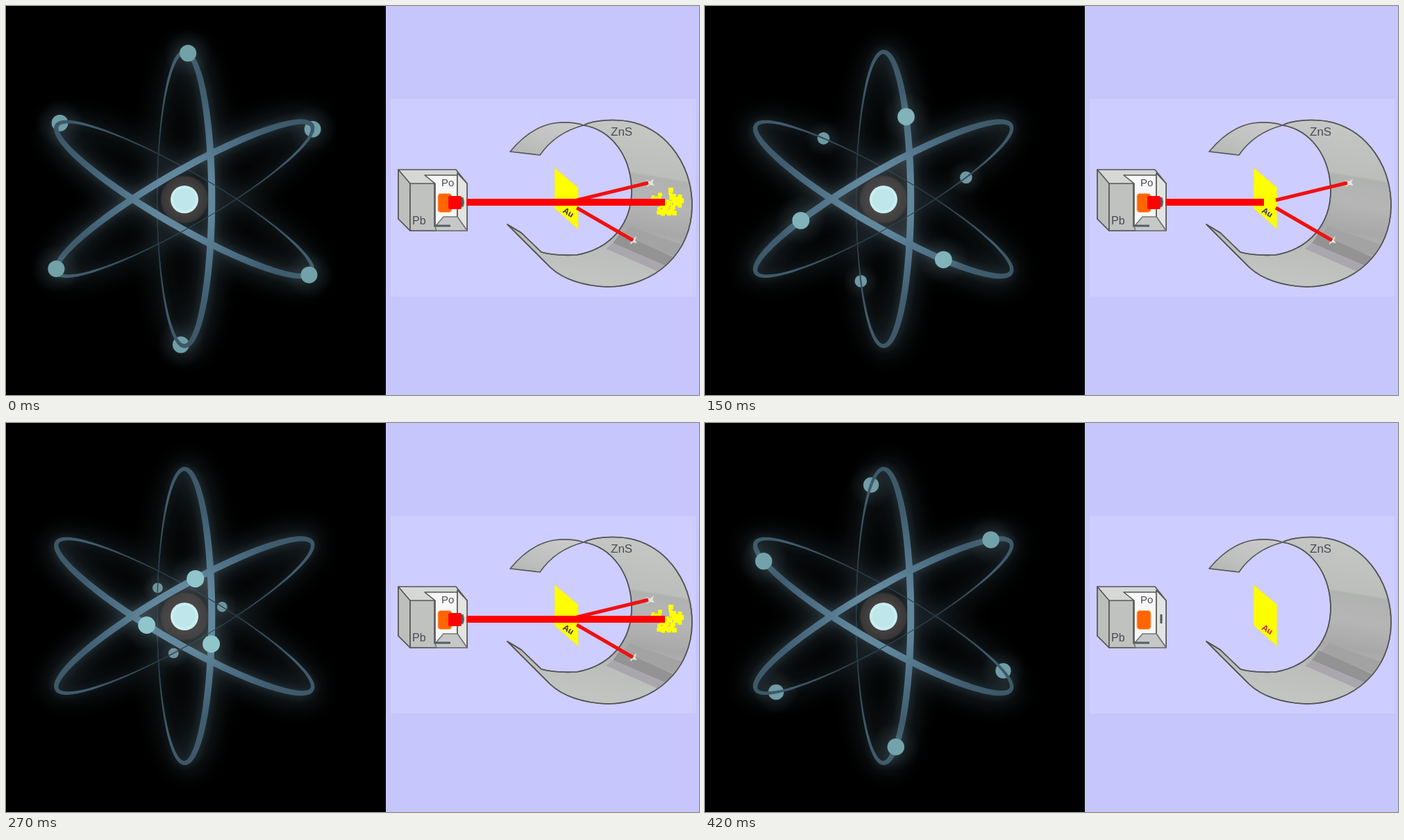
Recreate the animation shown at these times as an HTML page. Size 998x561 px, loop 450 ms.

```html
<!DOCTYPE html>
<html lang="en">
<head>
<meta charset="utf-8">
<title>Atom and scattering</title>
<style>
html, body { margin: 0; width: 100%; height: 100%; overflow: hidden; background: #000; }
svg { display: block; width: 100vw; height: 100vh; }
text { font-family: "Liberation Sans", Arial, sans-serif; fill: #4a4a54; }
</style>
</head>
<body>
<svg viewBox="0 0 998 561" preserveAspectRatio="none">
  <defs>
    <radialGradient id="line" gradientUnits="userSpaceOnUse" cx="257" cy="278.300" r="215">
      <stop offset=".2" stop-color="#62889d"/>
      <stop offset=".45" stop-color="#4f7186"/>
      <stop offset=".7" stop-color="#415e71"/>
      <stop offset="1" stop-color="#3c5867"/>
    </radialGradient>
    <radialGradient id="dim" gradientUnits="userSpaceOnUse" cx="0" cy="0" r="1" gradientTransform="translate(217 278.300) scale(48 175)">
      <stop offset=".35" stop-opacity=".58"/>
      <stop offset="1" stop-opacity="0"/>
    </radialGradient>
    <radialGradient id="core">
      <stop offset=".5" stop-color="#4a4545"/>
      <stop offset=".9" stop-color="#3d3a3a" stop-opacity=".9"/>
      <stop offset="1" stop-color="#333" stop-opacity="0"/>
    </radialGradient>
    <radialGradient id="halo">
      <stop offset="0" stop-color="#7fa5b0" stop-opacity=".17"/>
      <stop offset="1" stop-color="#7fa5b0" stop-opacity="0"/>
    </radialGradient>
    <linearGradient id="wall" gradientUnits="userSpaceOnUse" x1="945" y1="164" x2="905" y2="405">
      <stop offset="0" stop-color="#c6c8c6"/>
      <stop offset=".33" stop-color="#bcbebc"/>
      <stop offset=".345" stop-color="#b0b2b0"/>
      <stop offset=".5" stop-color="#b5b5b5"/>
      <stop offset=".66" stop-color="#a8a8a8"/>
      <stop offset=".82" stop-color="#bcbebc"/>
      <stop offset="1" stop-color="#c2c4c2"/>
    </linearGradient>
    <linearGradient id="flap" x1="0" y1="1" x2="1" y2="0">
      <stop offset="0" stop-color="#b4b6b4"/>
      <stop offset=".45" stop-color="#c0c2c0"/>
      <stop offset="1" stop-color="#ccc"/>
    </linearGradient>
    <filter id="wide" filterUnits="userSpaceOnUse" x="0" y="0" width="547" height="561"><feGaussianBlur stdDeviation="17"/></filter>
    <filter id="soft" filterUnits="userSpaceOnUse" x="0" y="0" width="547" height="561"><feGaussianBlur stdDeviation="7"/></filter>
    <path id="screen" d="M832 172C846 164 880 162 904 168C955 182 988 232 988 288C988 356 934 405 866 405C832 404 802 394 784 377L722 315L742 327L771 355C786 359 803 360 822 359C872 350 901 313 901 266C900 216 872 179 832 172Z"/>
    <clipPath id="inside"><use href="#screen"/></clipPath>
    <clipPath id="left"><rect width="547" height="561"/></clipPath>
  </defs>

  <rect width="547" height="561" fill="#000"/>
  <g clip-path="url(#left)">
    <g id="glow" filter="url(#wide)" opacity=".42" fill="none" stroke="#4d6570"></g>
    <g id="shine" filter="url(#soft)" opacity=".22"></g>
    <circle cx="257" cy="279" r="36" fill="url(#core)"/>
    <path id="tri" d="M183 275L293 213V341Z" fill="#5b5a5b"/>
    <g id="back"></g>
    <g id="rings"></g>
    <circle cx="257" cy="279" r="20" fill="#c9eef0"/>
    <circle cx="257" cy="279" r="16" fill="#bfe6ea"/>
    <g id="front"></g>
  </g>

  <rect x="547" width="451" height="561" fill="#c6c6fc"/>
  <rect x="554" y="134" width="440" height="285" fill="#cdcdff"/>

  <g stroke="#555" stroke-width="1.600" stroke-linejoin="round">
    <use href="#screen" fill="url(#wall)"/>
    <g clip-path="url(#inside)" stroke="none">
      <path d="M898 318L990 350V372L885 332Z" fill="#a3a3a3"/>
      <path d="M884 328L970 366L958 378L874 342Z" fill="#939393"/>
      <path d="M874 342L958 378L946 386L864 350Z" fill="#a9a7ad"/>
    </g>
    <use href="#screen" fill="none"/>
    <path d="M726 210C744 188 766 173 789 169C804 167 820 168 832 172C805 179 784 193 769 215Z" fill="url(#flap)"/>
  </g>
  <text x="871" y="187" font-size="17">ZnS</text>

  <g stroke="#555" stroke-width="1.600" stroke-linejoin="round">
    <path d="M565 236H648L664 256V324H582L565 307Z" fill="#d6d8d6"/>
    <path d="M565 236L582 256V324L565 307Z" fill="#bcbebc"/>
    <path d="M582 256H617V318H640L664 324H582Z" fill="#c0c2c0"/>
    <path d="M603 244H650V303L641 318H618V256Z" fill="#f8f8f8"/>
    <path d="M650 241L664 256V324L650 304Z" fill="#e2e4e2"/>
    <path d="M618 318L630 304H650L664 324H620Z" fill="#c6c8c8" stroke="#777"/>
    <path d="M618 317H640" stroke="#555c66" stroke-width="3"/>
    <path d="M657 276V289" stroke-width="3"/>
  </g>
  <text x="585" y="315" font-size="16">Pb</text>
  <text x="627" y="260" font-size="15" fill="#666">Po</text>
  <rect x="622" y="270.500" width="20" height="27" rx="4" fill="#ff6500" stroke="#ffb27c" stroke-width="1"/>

  <path d="M790 233L824 262V322L790 292Z" fill="#ff0" stroke="#e2de90" stroke-width="1.500"/>
  <text id="au" transform="translate(801 297) rotate(32)" font-size="12" font-weight="bold">Au</text>

  <g id="beam">
    <g id="splash" fill="#ff0"></g>
    <g fill="#e6e6e0">
      <path d="M921 251L928 253L933 249L931 255L934 259L927 258L923 261L925 256Z"/>
      <path d="M897 334L903 336L908 332L906 338L909 342L903 341L899 344L900 339Z"/>
    </g>
    <path d="M822 280L925 255M822 291L903 338" stroke="#f01010" stroke-width="5"/>
    <rect x="637" y="274" width="19" height="19" rx="2" fill="#f00"/>
    <path d="M657 276Q661 283 657 290" stroke="#666" stroke-width="2" fill="none"/>
    <path id="ray" stroke="#f00" stroke-width="10"/>
  </g>
</svg>
<script>
const NS = "http://www.w3.org/2000/svg";
const $ = id => document.getElementById(id);
const add = (parent, tag, attrs) => {
  const el = parent.appendChild(document.createElementNS(NS, tag));
  for (const k in attrs) el.setAttribute(k, attrs[k]);
  return el;
};

const CX = 257, CY = 278.3, RX = 39.3, RY = 212;
const STEP = 30, STEPS = 15;
const TURNS = [0, 120, 240];

// One edge of the orbit band, which is thick on the near side and thin on the far side
function edge(side) {
  const pts = [];
  for (let i = 0; i < 160; i++) {
    const a = i * Math.PI / 80, s = Math.sin(a), c = Math.cos(a);
    const w = side * (0.5 + 4.5 * ((1 + s) / 2) ** 0.85);
    const nx = s / RX, ny = -c / RY, len = Math.hypot(nx, ny);
    pts.push(`${(CX + RX * s + w * nx / len).toFixed(2)} ${(CY - RY * c + w * ny / len).toFixed(2)}`);
  }
  return `M${pts.join("L")}Z`;
}
const ring = edge(1) + edge(-1);

for (const turn of TURNS) {
  const transform = `rotate(${turn} ${CX} ${CY})`;
  const band = { d: ring, transform, "fill-rule": "evenodd" };
  add($("rings"), "path", { ...band, fill: "url(#line)" });
  add($("rings"), "path", { ...band, fill: "url(#dim)" });
  add($("shine"), "path", { ...band, fill: "#7fb0c8" });
  add($("glow"), "ellipse", { cx: CX, cy: CY, rx: RX, ry: RY, transform, "stroke-width": 13 });
  add($("glow"), "path", {
    d: `M${CX} ${CY - RY}A${RX} ${RY} 0 0 1 ${CX} ${CY + RY}`, transform, "stroke-width": 26
  });
}

const makeDots = parent => TURNS.map(turn => {
  const g = add(parent, "g", {});
  return { turn, g, halo: add(g, "circle", { fill: "url(#halo)" }), dot: add(g, "circle", {}) };
});
const near = makeDots($("front")), far = makeDots($("back"));

// Spark pattern on the screen
let seed = 11;
const rand = () => (seed = seed * 16807 % 2147483647) / 2147483647;
for (let i = 0; i < 46; i++) {
  const a = rand() * 2 * Math.PI, r = 19 * Math.sqrt(rand()), s = 4 + rand() * 4;
  add($("splash"), "rect", {
    x: 951 + r * 1.15 * Math.cos(a) - s / 2, y: 283 + r * Math.sin(a) - s / 2, width: s, height: s
  });
}

// Orbit angle in degrees at given steps
const keys = [[0, 7.5], [3, 31.5], [5, 56], [7, 74], [9, 101], [12, 129.5], [14, 153]];
function angle(n) {
  const i = Math.max(1, keys.findIndex(k => k[0] >= n));
  const [n0, a0] = keys[i - 1], [n1, a1] = keys[i];
  return a0 + (a1 - a0) * (n - n0) / (n1 - n0);
}

const mix = (a, b, k) => `rgb(${a.map((v, i) => Math.round(v + (b[i] - v) * k))})`;
function place(dots, deg, r, color) {
  for (const { turn, g, halo, dot } of dots) {
    const a = deg * Math.PI / 180, b = turn * Math.PI / 180;
    const x = RX * Math.sin(a), y = -RY * Math.cos(a);
    const px = CX + x * Math.cos(b) - y * Math.sin(b);
    const py = CY + x * Math.sin(b) + y * Math.cos(b);
    g.setAttribute("transform", `translate(${px.toFixed(2)} ${py.toFixed(2)})`);
    halo.setAttribute("r", r * 3);
    dot.setAttribute("r", r);
    dot.setAttribute("fill", color);
  }
}

function draw(ms) {
  const n = Math.floor(ms / STEP) % STEPS;
  const deg = angle(n), s = Math.sin(deg * Math.PI / 180), k = s ** 4;
  place(near, deg, 12 + s * 0.5, mix([114, 161, 168], [146, 200, 207], k));
  place(far, deg + 180, 12 - 4.8 * s ** 2.2, mix([112, 158, 166], [110, 146, 158], k));
  $("tri").setAttribute("opacity", 0.85 * Math.exp(-(((deg - 79) / 14) ** 2) / 2));

  const on = n < 11, full = n < 3 || n > 6;
  $("beam").style.display = on ? "" : "none";
  $("splash").style.display = full ? "" : "none";
  $("ray").setAttribute("d", `M663 283H${full ? 949 : 805}`);
  $("au").style.fill = on ? "#33286e" : "#c0203c";
}

const start = performance.now();
function tick() {
  draw(performance.now() - start);
  requestAnimationFrame(tick);
}
draw(0);
requestAnimationFrame(tick);
</script>
</body>
</html>
```
